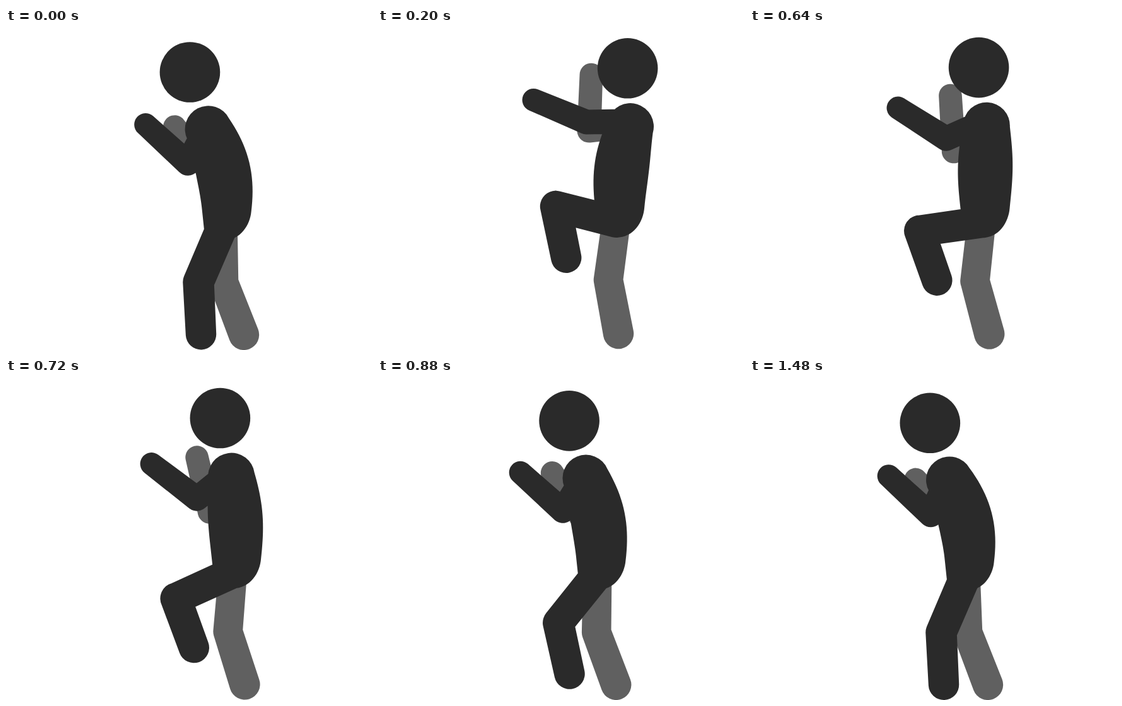
These frames come from a looping animation (580x510 px, 1.6 s). An HTML page:

```html
<!DOCTYPE html>
<html lang="en">
<head>
<meta charset="utf-8">
<title>Knee lift</title>
<style>
  html, body { margin: 0; width: 100%; height: 100%; overflow: hidden; background: #fff; }
  svg { display: block; width: 580px; height: 510px; }
</style>
</head>
<body>
<svg viewBox="0 0 580 510">
  <path id="back" fill="#606060"/>
  <path id="front" fill="#2a2a2a"/>
  <circle id="head" r="47.8" fill="#2a2a2a"/>
</svg>
<script>
const LOOP = 1600, TICK = 40;

const clamp = u => Math.min(1, Math.max(0, u));
const mix = (a, b, u) => a + (b - a) * u;
const inOut = u => u < 0.5 ? 2 * u * u : 1 - 2 * (1 - u) ** 2;
const easeOut = u => u * (2 - u);

const add = (p, x, y) => [p[0] + x, p[1] + y];
const polar = (p, r, deg) =>
  add(p, r * Math.cos(deg * Math.PI / 180), r * Math.sin(deg * Math.PI / 180));
const angle = (a, b) => Math.atan2(b[1] - a[1], b[0] - a[0]) * 180 / Math.PI;
const between = (a, b, u) => [mix(a[0], b[0], u), mix(a[1], b[1], u)];
const xy = p => p[0].toFixed(2) + " " + p[1].toFixed(2);

// Body, arms and leg share one rise and fall, each with its own easing
function progress(t) {
  const clock = (t + 40) % LOOP;
  const up = clamp(clock / 240), down = clamp((1080 - clock) / 500);
  return {
    lean: inOut(up) * down ** 1.6,
    raise: up ** 1.75 * down ** 2,
    lift: (1 - (1 - clamp((clock - 40) / 200)) ** 1.45) * down ** 1.45
  };
}

// Forward kinematics from the hip; angles in degrees, 90 points down
function poseAt(t) {
  const { lean, raise, lift } = progress(t);
  const hip = [mix(342, 377.5, lean), mix(312, 307, easeOut(lean))];
  const shoulder = polar(hip, 153, mix(-99.8, -81.5, lean));
  const head = polar(shoulder, mix(95, 92, lean), mix(-108.8, -92.8, lean));

  const armTop = add(shoulder, 0, -8);
  const elbow = polar(armTop, 70, mix(115, 179, raise));
  const hand = polar(elbow, 90.5, mix(222.7, 202.7, raise ** 1.5));
  const backElbow = polar(shoulder, 66, mix(85, 174, raise));
  const backHand = polar(backElbow, 88.5, mix(-131.8, -87.8, easeOut(raise)));

  const knee = polar(hip, 99, mix(113.2, 194.3, lift));
  const swing = 51 * lift * (1 - lift);
  const foot = polar(knee, 83, mix(87.2, 78.4, lift) - swing);
  const backKnee = between([345, 403], [365, 399], lift ** 1.7);
  const backFoot = between([377, 486], [381, 484], lift ** 1.7);
  return { lean, hip, shoulder, head, armTop, elbow, hand, backElbow, backHand,
           knee, foot, backKnee, backFoot };
}

// Tapered capsule between two circles
function limb(a, ra, b, rb) {
  const dir = angle(a, b), length = Math.hypot(b[0] - a[0], b[1] - a[1]);
  const off = Math.acos((ra - rb) / length) * 180 / Math.PI;
  const arc = (r, large, p) => `A${r} ${r} 0 ${large ? 1 : 0} 1 ${xy(p)}`;
  return "M" + xy(polar(a, ra, dir + off))
    + arc(ra, ra > rb, polar(a, ra, dir - off))
    + "L" + xy(polar(b, rb, dir - off))
    + arc(rb, rb > ra, polar(b, rb, dir + off)) + "Z";
}

// Bent spine with a swelling width, a round shoulder and a curved seat
function torso({ shoulder, hip, lean }) {
  const low = add(hip, 5.7, -22);
  const bend = add(between(shoulder, low, 0.5), mix(18, -10, lean), -4);
  const right = [], left = [], steps = 20;
  for (let i = 0; i <= steps; i++) {
    const s = i / steps;
    const a = between(shoulder, bend, s), b = between(bend, low, s);
    const p = between(a, b, s), dir = angle(a, b);
    const r = 37 + 2 * s + 5.3 * Math.sin(Math.PI * s);
    right.push(xy(polar(p, r, dir - 90)));
    left.push(xy(polar(p, r, dir + 90)));
  }
  return "M" + right.join("L")
    + `C${xy(add(hip, 43, 0))} ${xy(add(hip, 28, 25))} ${xy(add(hip, 0, 25))}`
    + "L" + xy(add(hip, -30, 8))
    + "L" + left.reverse().join("L")
    + `A37 37 0 0 1 ${right[0]}Z`;
}

const el = id => document.getElementById(id);
const back = el("back"), front = el("front"), head = el("head");

function draw(t) {
  const p = poseAt(t);
  back.setAttribute("d",
    limb(p.shoulder, 18.5, p.backElbow, 19) + limb(p.backElbow, 19, p.backHand, 18.3)
    + limb(p.hip, 22.7, p.backKnee, 23.3) + limb(p.backKnee, 23.3, p.backFoot, 24.2));
  front.setAttribute("d",
    torso(p)
    + limb(p.armTop, 19.5, p.elbow, 19.5) + limb(p.elbow, 19.5, p.hand, 18)
    + limb(p.hip, 25, p.knee, 24.7) + limb(p.knee, 24.7, p.foot, 24.2));
  head.setAttribute("cx", p.head[0]);
  head.setAttribute("cy", p.head[1]);
}

const start = performance.now();
function frame() {
  const t = (performance.now() - start) % LOOP;
  draw(Math.floor(t / TICK) * TICK);
  requestAnimationFrame(frame);
}
frame();
</script>
</body>
</html>
```
